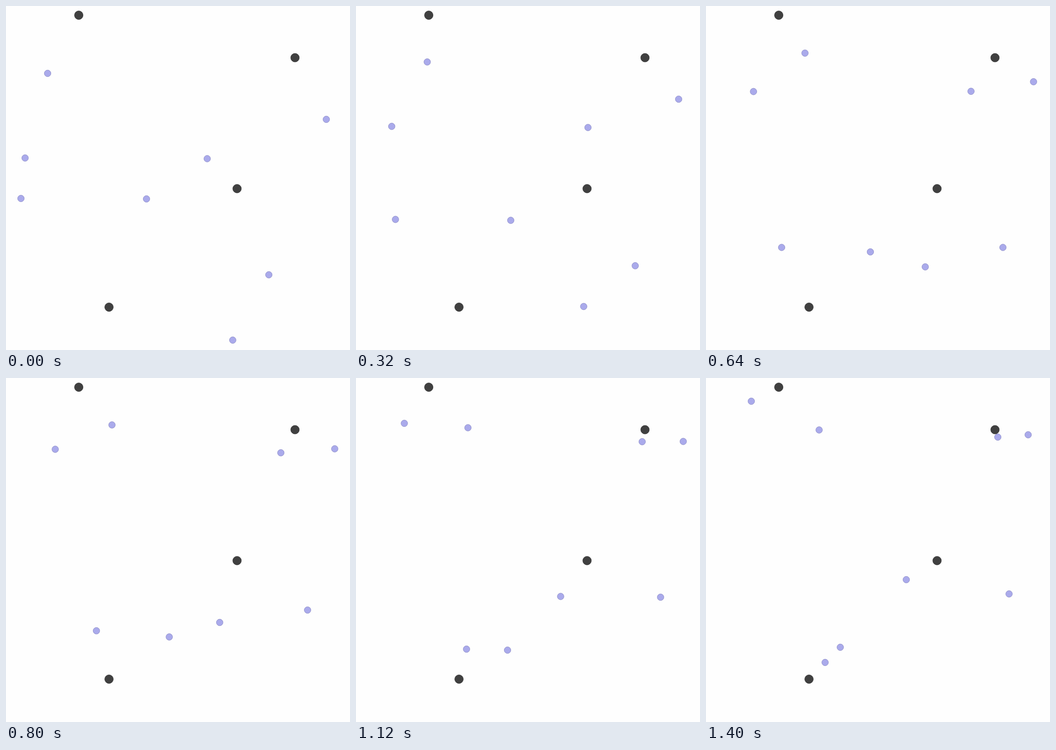
Animation of 748 by 748 pixels, one loop 1.44 s. Source, as an HTML page:

```html
<!DOCTYPE html>
<html lang="en">
<head>
<meta charset="utf-8">
<title>Drifting dots</title>
<style>
  html, body { margin: 0; width: 100%; height: 100%; overflow: hidden; background: #fefefe; }
  svg { display: block; width: 100%; height: 100%; }
  .post { fill: #404040; stroke: #333; stroke-width: .8; }
  .dot { fill: #aaaaeb; stroke: #8c8cc4; stroke-width: .9; }
</style>
</head>
<body>
<!-- Whole coordinates fall on pixel centres. -->
<svg id="stage" viewBox="-.5 -.5 748 748"></svg>
<script>
const LOOP = 1440, STEP = 40;
const posts = ['157.7,19.5', '627.9,111.9', '501.9,396.6', '223.5,654.3'];

// Each dot drifts along one smooth curve through five evenly timed points.
const paths = [
  '90,146 150,123 204,104 236,103 245.5,112.5',
  '41,330 75,266 99,202 107,136 98,50',
  '32,418 81,460 146,511 213,563 258.5,618',
  '305,419 334,462 355,518 349,576 291.5,585',
  '437,331.5 499,269 562,200 607,152 634,128',
  '696,246 700.5,205 709.5,171 714.5,148 700,123',
  '571,584 604,566 638,535 659,493 658.5,469',
  '492.5,726 495,658 482,586 457,511 435,438'
];

const toPoints = text => text.split(' ').map(pair => pair.split(',').map(Number));

// Quick start, then a long slowdown; runs from 0 to 1.
const ease = p => 4.37 * p ** 1.65 / (1 + 3.37 * p ** 1.4);

const mix = (a, b, k) => a.map((v, i) => v + (b[i] - v) * k);

// Polynomial through evenly spaced points; u counts from the first one.
function curve(points, u) {
  for (let span = 1; points.length > 1; span++) {
    points = points.slice(1).map((p, i) => mix(points[i], p, (u - i) / span));
  }
  return points[0];
}

const stage = document.getElementById('stage');

function place(el, [x, y]) {
  el.setAttribute('cx', x);
  el.setAttribute('cy', y);
}

function circle(type, r, at) {
  const el = document.createElementNS(stage.namespaceURI, 'circle');
  el.setAttribute('class', type);
  el.setAttribute('r', r);
  place(el, at);
  return stage.appendChild(el);
}

const dots = paths.map(path => {
  const points = toPoints(path);
  return { points, el: circle('dot', 7.2, points[0]) };
});
posts.forEach(post => circle('post', 9.4, toPoints(post)[0]));

const start = performance.now();

function draw(now) {
  const elapsed = Math.max(0, now - start) % LOOP;
  const progress = Math.floor(elapsed / STEP) * STEP / (LOOP - STEP);
  for (const { el, points } of dots) {
    place(el, curve(points, ease(progress) * (points.length - 1)));
  }
  requestAnimationFrame(draw);
}
draw(start);
</script>
</body>
</html>
```
